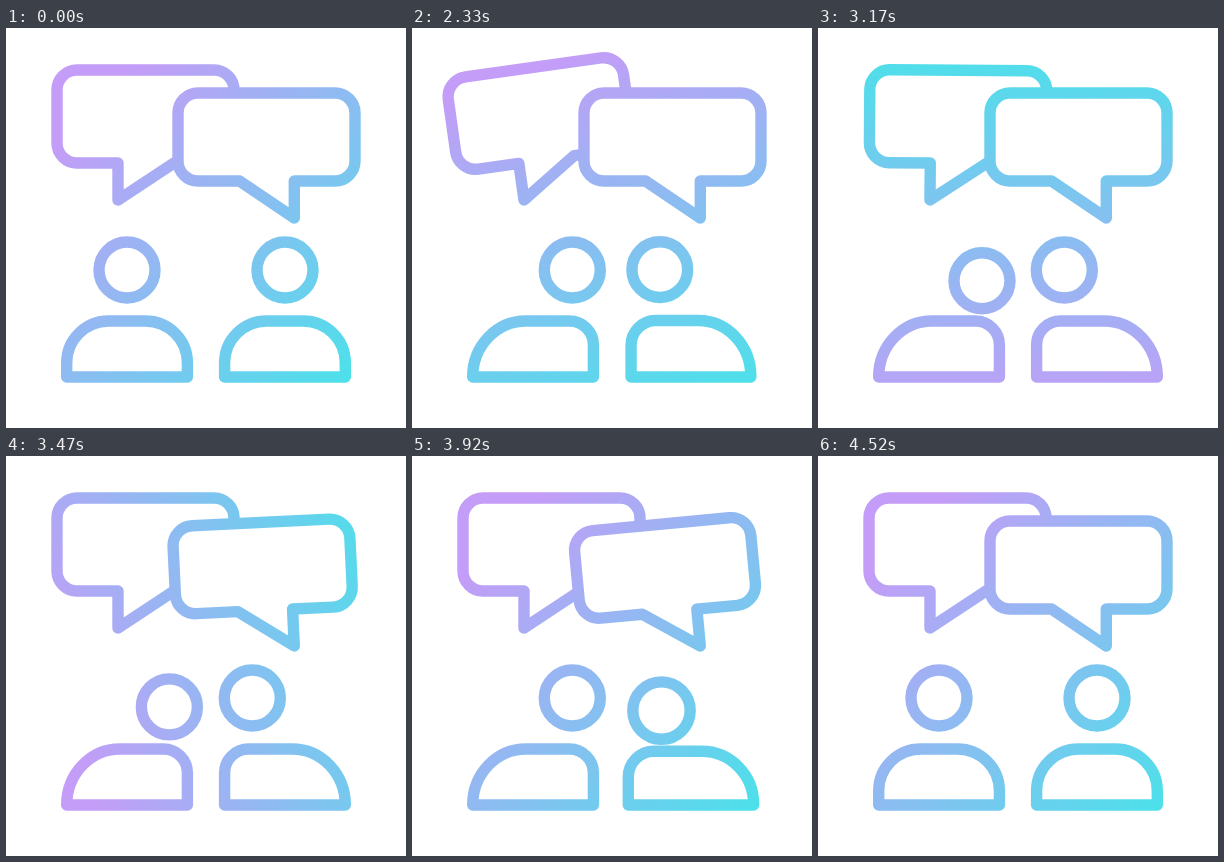
An HTML page that plays this animation: 400x400 px, repeating every 4550 ms.

```html
<!DOCTYPE html>
<html lang="en">
<head>
<meta charset="utf-8">
<title>Conversation</title>
<style>
html, body { margin: 0; width: 100%; height: 100%; overflow: hidden; background: #fff; }
svg { display: block; width: 100%; height: 100%; }
.line { fill: none; stroke: url(#tint); stroke-width: 11.4; stroke-linejoin: round; }
#bubbleL { stroke: url(#tintL); }
#bubbleR { stroke: url(#tintR); fill: #fff; }
</style>
</head>
<body>
<svg viewBox="0 0 400 400">
  <defs>
    <linearGradient id="tint" gradientUnits="userSpaceOnUse">
      <stop offset="0" stop-color="#c39df7"/>
      <stop offset="1" stop-color="#4be1ea"/>
    </linearGradient>
    <linearGradient id="tintL" href="#tint"/>
    <linearGradient id="tintR" href="#tint"/>
  </defs>
  <path id="bubbleL" class="line" d="M71 42H208a20 20 0 0 1 20 20V115a20 20 0 0 1-20 20H168L112 172V135H71a20 20 0 0 1-20-20V62a20 20 0 0 1 20-20Z"/>
  <path id="bubbleR" class="line" d="M192 65H329a20 20 0 0 1 20 20V133a20 20 0 0 1-20 20H288.3V190L233.5 153H192a20 20 0 0 1-20-20V85a20 20 0 0 1 20-20Z"/>
  <path id="bodyL" class="line"/>
  <path id="bodyR" class="line"/>
  <circle id="headL" class="line"/>
  <circle id="headR" class="line"/>
</svg>
<script>
const LOOP = 4550, STEP = 30;
const { PI, sin, cos, exp, abs, min, max, floor } = Math;
const set = (id, attrs) => {
  for (const k in attrs) document.getElementById(id).setAttribute(k, attrs[k]);
};
const mix = (a, b, k) => a + (b - a) * k;

// Progress of t from a to b, and the curves built on it
const part = (t, a, b) => min(1, max(0, (t - a) / (b - a)));
const ease = (t, a, b) => { const u = part(t, a, b); return u * u * (3 - 2 * u); };
const bump = (t, a, b) => sin(PI * part(t, a, b));
const wobble = (t, a, b) => { const u = part(t, a, b); return sin(2 * PI * u) * (1 - u); };

const people = [
  { side: 'L', x: 121, leanX: 160.3, come: 2005, go: 4025, nods: true },
  { side: 'R', x: 279, leanX: 246.3, come: 2060, go: 3860, nods: false }
];

// Shoulders: k leans inwards, s widens and lowers; flip mirrors the shape
function shoulders(k, s, flip) {
  const X = x => flip ? 400 - x : x;
  const sweep = flip ? 0 : 1;
  const x0 = 60.7 - s, x1 = 181.4 + s, top = 293 + s;
  const rx = mix(42, 53, k), ry = mix(42, 56 - s, k), r = mix(42, 24, k);
  return `M${X(x0)} 349V${top + ry}A${rx} ${ry} 0 0 ${sweep} ${X(x0 + rx)} ${top}` +
    `H${X(x1 - r)}A${r} ${r} 0 0 ${sweep} ${X(x1)} ${top + r}V349Z`;
}

function person({ side, x, leanX, come, go, nods }, t) {
  const lean = ease(t, come, come + 310) - ease(t, go, go + 310);
  const arrive = wobble(t, come, come + 310), leave = bump(t, go, go + 310);
  const nod = nods ? bump(t, 2700, 3800) : 0;
  const squash = 5 * arrive + 4 * leave;
  set('head' + side, {
    cx: mix(x, leanX, lean) + 3.8 * nod,
    cy: 242 + 4 * arrive + 22 * leave + 11 * nod,
    r: 28 + 0.3 * squash
  });
  set('body' + side, { d: shoulders(lean, squash, side === 'R') });
}

// Jumps back, rests tilted, then swings upright
function tiltLeft(t) {
  const rest = ease(t, 2015, 2300) - ease(t, 2780, 2960);
  return -8 * rest - 18 * bump(t, 2015, 2325) + 4 * bump(t, 2880, 3180);
}

// A swing that swells and dies away around its peak
function tiltRight(t) {
  const d = t - 3645;
  const gate = ease(t, 3200, 3400) - ease(t, 4250, 4500);
  return 15 * gate * cos(2 * PI * d / 570) * exp(-abs(d) / 270);
}

// The counter-turn keeps the tint fixed to the stage
function bubble(side, tilt, px, py) {
  set('bubble' + side, { transform: `rotate(${tilt} ${px} ${py})` });
  set('tint' + side, { gradientTransform: `rotate(${-tilt} ${px} ${py})` });
}

function draw(t) {
  const a = PI / 4 + 2 * PI * ease(t, 2000, 4020);
  const dx = 187 * cos(a), dy = 187 * sin(a);
  set('tint', { x1: 235 - dx, y1: 200 - dy, x2: 235 + dx, y2: 200 + dy });
  bubble('L', tiltLeft(t), 112, 172);
  bubble('R', tiltRight(t), 288, 190);
  people.forEach(p => person(p, t));
}

let start = null;
function tick(now) {
  if (start === null) start = now;
  const t = (now - start) % LOOP;
  draw(floor((t + 10) / STEP) * STEP - 10);
  requestAnimationFrame(tick);
}
draw(0);
requestAnimationFrame(tick);
</script>
</body>
</html>
```
